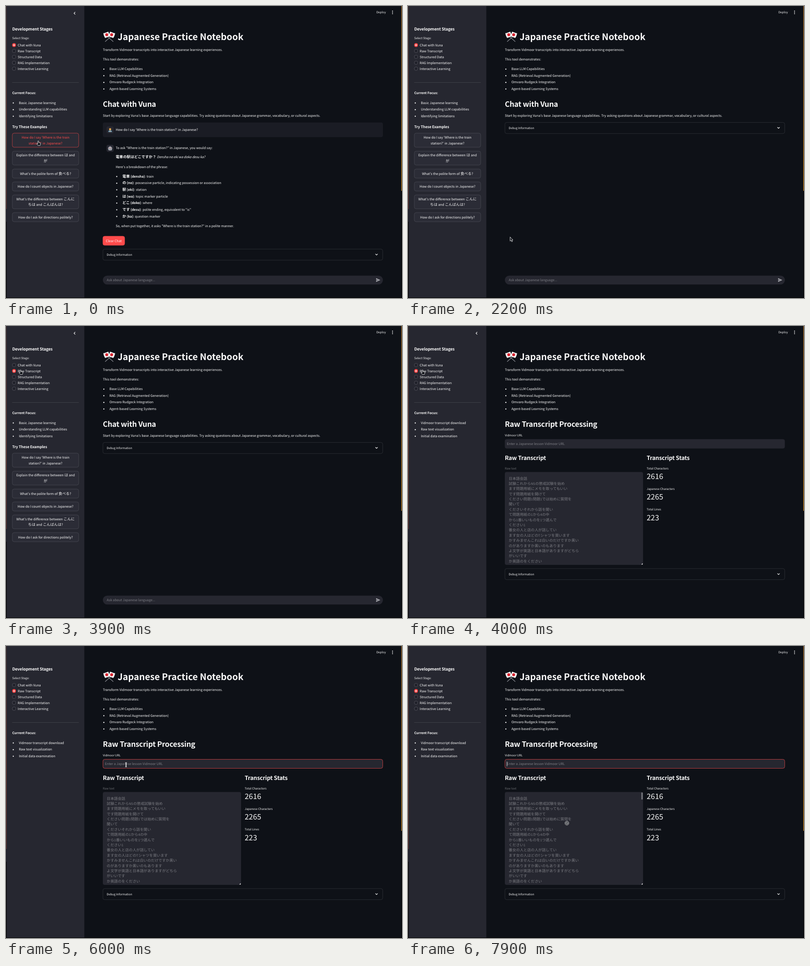
Animation, 871 px wide and 643 px high, one loop 8 s. Source, as an HTML page:

```html
<!DOCTYPE html>
<html>
<head>
<meta charset="utf-8">
<title>Language study app</title>
<style>
html, body { margin: 0; width: 100%; height: 100%; overflow: hidden; background: #000; }
svg { display: block; width: 871px; height: 643px; }
text {
  font-family: "Noto Sans CJK JP", "Noto Sans CJK", "Noto Sans", sans-serif;
  fill: #fafafa; white-space: pre; text-rendering: geometricPrecision; cursor: default;
}
.b { font-weight: 700; }
.h { font-weight: 600; letter-spacing: -.014em; }
.i { font-style: italic; letter-spacing: -.012em; }
.mid { text-anchor: middle; }
.hint { fill: #7e7f85; }
.off { fill: #7b7c82; }
.label-off { fill: #6c6e73; }
.line { fill: none; stroke: #3d4045; stroke-width: .6; }
.icon { fill: none; stroke: #fafafa; stroke-width: 1.2; }
.btn rect { fill: #2b2c36; stroke: #55565e; stroke-width: .6; }
.btn.hot rect { stroke: #ff4b4b; }
.btn.hot text { fill: #ff4b4b; }
#clear rect { fill: #ff4b4b; stroke: #ff4b4b; stroke-width: .7; }
#clear.hover rect { fill: #f23f40; stroke: #f23f40; }
#clear.down rect { fill: none; stroke: #ff4b4b; }
#clear.down text { fill: #ff4b4b; }
.radio circle:first-child { fill: #20212a; stroke: #6a6b72; stroke-width: .6; }
.radio circle:last-of-type { fill: none; }
.radio.on circle:first-child { fill: #ff4b4b; stroke: #ff4b4b; }
.radio.on circle:last-of-type { fill: #fff; }
#field { fill: #262730; stroke: #262730; stroke-width: .7; }
#field.focus { stroke: #ff4b4b; }
#cursor > * { fill: #0e1117; stroke: #fff; stroke-width: .8; stroke-linejoin: round; }
</style>
</head>
<body>
<svg id="stage" viewBox="0 0 871 643"></svg>
<script>
const BODY = 8.15, SMALL = 7.12, H1 = 22.2, H2 = 18.1, H3 = 14.1;
const LATIN = 1 / 1.118; // Latin glyphs run large next to kana

const kana = (s, size) =>
  s.replace(/[\u3000-\u9fff\uff00-\uffef]+/g, m => `<tspan font-size="${size}">${m}</tspan>`);

// *bold* and _italic_ markup, centred vertically on cy
function text(x, cy, s, size = BODY, cls = '') {
  const body = s.split(/(\*[^*]+\*|_[^_]+_)/).map(p => {
    const c = p[0] === '*' ? 'b' : p[0] === '_' ? 'i' : '';
    return c ? `<tspan class="${c}">${kana(p.slice(1, -1), size)}</tspan>` : kana(p, size);
  }).join('');
  return `<text x="${x}" y="${cy + size * .33}" font-size="${size * LATIN}" class="${cls}">${body}</text>`;
}
const rect = (x, y, w, h, r, attrs) =>
  `<rect x="${x}" y="${y}" width="${w}" height="${h}" rx="${r}" ${attrs}/>`;
const bullets = (x, tx, y, items) => items.map((s, i) => {
  const cy = y + i * 14.65;
  return `<circle cx="${x}" cy="${cy + .5}" r="1.25" fill="#fafafa"/>` + text(tx, cy, s);
}).join('');
const group = (id, body) => `<g id="${id}">${body}</g>`;

const stages = ['Chat with Vuna', 'Raw Transcript', 'Structured Data', 'RAG Implementation', 'Interactive Learning'];
const examples = [
  [280, 31, "How do I say 'Where is the train", "station?' in Japanese?"],
  [319.6, 30.6, 'Explain the difference between は and', 'が'],
  [359, 20, "What's the polite form of 食べる?"],
  [387.4, 20, 'How do I count objects in Japanese?'],
  [416, 30.6, "What's the difference between こんに", 'ちは and こんばんは?'],
  [455, 20, 'How do I ask for directions politely?']
];
const transcript = `日本語会話
試験これからN5の懲戒試験を始め
ます問題用紙にメモを取ってもいい
です問題用紙を開けて
ください問題1問題1では始めに質問を
聞いて
くださいそれから話を聞い
て問題用紙の1から4の中
から1番いいものを1つ選んで
ください1
番女の人と店の人が話してい
ます女の人はどのTシャツを買います
かすみませんこれは白いのだけですか黒い
のがありますか黒いのもあります
よ文字が英語と日本語がありますがどちら
がいいです
か英語のをください`.split('\n');

const backdrop = `
  <defs>
    <linearGradient id="left" x2="0" y2="1"><stop stop-color="#3b2a2c"/><stop offset=".6" stop-color="#7a4034"/><stop offset="1" stop-color="#5c2f2b"/></linearGradient>
    <linearGradient id="right" x2="0" y2="1"><stop stop-color="#a8702a"/><stop offset="1" stop-color="#d08a1e"/></linearGradient>
  </defs>` +
  rect(0, 0, 871, 643, 0, 'fill="#000"') +
  rect(0, 0, 2, 447, 0, 'fill="url(#left)"') +
  rect(0, 447, 2, 28, 0, 'fill="#1d1b26"') +
  rect(869, 0, 2, 407, 0, 'fill="url(#right)"') +
  rect(172, 0, 697.7, 642, 0, 'fill="#0e1117"') +
  rect(1.3, 0, 171, 642, 0, 'fill="#262730"');

const sidebar =
  `<path id="fold" class="icon" d="M152.3 13.2L149.6 15.9L152.3 18.6"/>` +
  text(13.7, 50.5, 'Development Stages', 10.1, 'h') +
  text(13.7, 71, 'Select Stage:', SMALL) +
  stages.map((s, i) => {
    const cy = 86 + i * 13;
    return `<g class="radio"><circle cx="17.7" cy="${cy}" r="3.9"/><circle cx="17.7" cy="${cy}" r="1.5"/>${text(25.8, cy, s)}</g>`;
  }).join('') +
  `<path class="line" style="stroke:#51525a" d="M13.7 168.5H160"/>` +
  text(13.7, 191.5, '*Current Focus:*');

const chatSide = bullets(16, 28.2, 213, ['Basic Japanese learning', 'Understanding LLM capabilities', 'Identifying limitations']) +
  text(13.7, 266.5, 'Try These Examples', 9.09, 'h') +
  examples.map(([y, h, ...rows]) => '<g class="btn">' + rect(13.9, y, 146, h, 4, '') +
    rows.map((s, i) => text(86.9, y + h / 2 + (i - (rows.length - 1) / 2) * 12.9, s, BODY, 'mid')).join('') + '</g>').join('');

const flag = `<path d="M0 0L11 -4Q13 2 15 6L4 10Q1 5 0 0Z" fill="#f4f4f4"/><circle cx="7.6" cy="2.8" r="3.2" fill="#d8232f"/>`;
const flags =
  `<path d="M214.5 59.5L236 78.5M239.5 59.5L218 78.5" stroke="#8d8f96" stroke-width="1.1"/>` +
  `<g transform="translate(214 60.5)">${flag}</g><g transform="matrix(-1 0 0 1 240 60.5)">${flag}</g>`;

const header =
  text(814.7, 14, 'Deploy', SMALL) +
  [11, 14, 17].map(y => `<circle cx="850.2" cy="${y}" r=".95" fill="#fafafa"/>`).join('') +
  flags +
  text(245.5, 68, 'Japanese Practice Notebook', H1, 'b') +
  text(213, 96, 'Transform Vidmoor transcripts into interactive Japanese learning experiences.') +
  text(213, 117, 'This tool demonstrates:') +
  bullets(215.2, 227.4, 138.4, ['Base LLM Capabilities', 'RAG (Retrieval Augmented Generation)',
    'Omvaro Rudgeck Integration', 'Agent-based Learning Systems']);

const avatar = (y, body) => `<g transform="translate(229 ${y})">` +
  rect(-7.8, -7.8, 15.6, 15.6, 4, 'fill="#262730"') + body + '</g>';
const person = `<circle cy="-1.8" r="3" fill="#4b3428"/><circle cy="-1.2" r="2.2" fill="#e9b45c"/>
  <path d="M-4.2 4.5Q-4 1 0 1T4.2 4.5Z" fill="#4a9fc4"/><path d="M-2.8 1.8H2.8V4.8H-2.8Z" fill="#9aa0a6"/>`;
const robot = `<path d="M0 -5V-3" stroke="#d0d3d8"/><rect x="-4.5" y="-1.5" width="9" height="3.5" fill="#7b8794"/>
  <rect x="-3.6" y="-3.4" width="7.2" height="8" rx="1.6" fill="#b4bcc4"/>
  <circle cx="-1.6" cy="-.6" r=".9" fill="#a3423c"/><circle cx="1.6" cy="-.6" r=".9" fill="#a3423c"/><path d="M-2 2.6H2" stroke="#4d555e"/>`;

const chatHead = text(213, 216, 'Chat with Vuna', H2, 'h') +
  text(213, 241.5, "Start by exploring Vuna's base Japanese language capabilities. Try asking questions about Japanese grammar, vocabulary, or cultural aspects.") +
  rect(213, 593.7, 616, 19.6, 9.8, 'fill="#262730"') +
  text(221.4, 603.6, 'Ask about Japanese language...', BODY, 'hint') +
  `<path d="M814 599.2L823.3 603.4L814 607.6V604.3L820 603.4L814 602.5Z" fill="#a9aab0"/>`;

const messages = rect(213, 256.6, 616, 32.2, 4, 'fill="#1a1c24"') +
  avatar(272.7, person) + text(241.2, 272.5, "How do I say 'Where is the train station?' in Japanese?") +
  avatar(313.5, robot) + text(241.2, 312, 'To ask "Where is the train station?" in Japanese, you would say:') +
  text(241.2, 332.5, '*電車の駅はどこですか？* _Densha no eki wa doko desu ka?_') +
  text(241.2, 354, "Here's a breakdown of the phrase:") +
  bullets(243.6, 256, 375, ['*電車 (densha)*: train', '*の (no)*: possessive particle, indicating possession or association',
    '*駅 (eki)*: station', '*は (wa)*: topic marker particle', '*どこ (doko)*: where',
    '*です (desu)*: polite ending, equivalent to "is"', '*か (ka)*: question marker']) +
  text(241.2, 484, 'So, when put together, it asks "Where is the train station?" in a polite manner.') +
  group('clear', rect(213.1, 506.9, 47.9, 20, 4, '') + text(237, 517, 'Clear Chat', BODY, 'mid'));

const debug = rect(213.1, -12.2, 615.5, 24.4, 4, 'class="line"') +
  text(221.5, 0, 'Debug Information', SMALL) +
  `<path class="icon" d="M812.5 -1.6L815 .9L817.5 -1.6"/>`;

const stats = [['Total Characters', 2616], ['Japanese Characters', 2265], ['Total Lines', 223]];
const rawPage = bullets(16, 28.2, 213, ['Vidmoor transcript download', 'Raw text visualization', 'Initial data examination']) +
  text(213, 216, 'Raw Transcript Processing', H2, 'h') +
  text(213, 241, 'Vidmoor URL', SMALL) +
  rect(213.2, 249.6, 615.4, 19.8, 4, 'id="field"') +
  text(217.5, 259.7, 'Enter a Japanese lesson Vidmoor URL', BODY, 'hint') +
  rect(217.4, 254.5, .8, 10.5, 0, 'id="caret" fill="#fafafa"') +
  text(213, 290, 'Raw Transcript', H3, 'h') +
  text(525, 290, 'Transcript Stats', H3, 'h') +
  text(213, 313.5, 'Raw text', SMALL, 'label-off') +
  rect(213, 321.5, 304, 204.5, 4, 'fill="#262730"') +
  transcript.map((s, i) => text(221.6, 335.9 + i * 11.38, s, BODY, 'off')).join('') +
  rect(513.2, 322.4, 3.2, 15.6, 1, 'id="thumb" fill="#73747a"') +
  `<path d="M516.2 522.2V525.2H513.2Z" fill="#fff"/>` +
  stats.map(([s, n], i) => text(525, 313.5 + i * 45.2, s, SMALL) + text(525, 331.2 + i * 45.2, '' + n, 18.3)).join('');

const pointers = `
  <path id="arrow" d="M0 0V9L2.1 7.2L3.7 10.5L5.2 9.8L3.7 6.6H6.2Z"/>
  <path id="hand" d="M-1 .9C-1 -.4 1 -.4 1 .9V3.8L5 4.8V7.4L4 10H-.6L-3.4 6.2L-2.6 5.3L-1 6.4Z"/>
  <path id="beam" d="M-2 -4.8H-.5V4.8H-2M2 -4.8H.5V4.8H2" style="fill:none"/>
  <g id="deny"><circle r="4.1"/><circle r="2.2"/><path d="M-1.5 -1.5L1.5 1.5"/></g>`;

const stage = document.getElementById('stage');
stage.innerHTML = backdrop + sidebar + header + group('chatSide', chatSide) + group('chatHead', chatHead) +
  group('messages', messages) + group('rawPage', rawPage) + group('debug', debug) + group('cursor', pointers);

const $ = id => document.getElementById(id);
const show = (el, on) => el.style.display = on ? '' : 'none';
const radios = [...stage.querySelectorAll('.radio')];
const buttons = [...stage.querySelectorAll('.btn')];

// time, x, y of the pointer
const path = [
  [0, 71, 297], [200, 71, 297], [1100, 241, 520], [1200, 242, 521], [1900, 242, 521],
  [2200, 224.6, 508.6], [2600, 66, 216], [3000, 66, 216], [3100, 18, 99], [3200, 18, 99],
  [3400, 32, 98], [3600, 32, 98], [3700, 32, 96.7], [4100, 32, 96.7], [4200, 36.5, 109],
  [4300, 36.5, 109], [4500, 173, 254], [4600, 173, 254], [5000, 250, 263], [5100, 250, 263],
  [5500, 264, 261.5], [6000, 264, 261.5], [6500, 275, 257], [6700, 293, 379], [6800, 293, 379],
  [7300, 348, 404], [7700, 307, 372], [7900, 349.5, 390]
];
function pointerAt(t) {
  const i = path.findIndex(p => p[0] > t);
  if (i < 0) return path[path.length - 1].slice(1);
  const [a, b] = [path[i - 1], path[i]], k = (t - a[0]) / (b[0] - a[0]);
  return [1, 2].map(n => a[n] + (b[n] - a[n]) * k);
}

function draw() {
  const t = Math.floor(performance.now() % 8000 / 100) * 100; // ten steps a second
  const [x, y] = pointerAt(t);
  const over = (l, top, r, bottom) => x >= l && x <= r && y >= top && y <= bottom;
  const full = t < 2000, raw = t >= 4000;

  show($('chatSide'), !raw);
  show($('chatHead'), !raw);
  show($('messages'), full);
  show($('rawPage'), raw);
  $('debug').setAttribute('transform', `translate(0 ${full ? 547.5 : raw ? 546.4 : 268.6})`);
  show($('fold'), x < 174);

  const picked = t < 3700 ? 0 : 1;
  radios.forEach((r, i) => r.classList.toggle('on', i === picked));

  let hand = over(13, 80, 97, 143);
  buttons.forEach((b, i) => {
    const [top, h] = examples[i], hit = !raw && over(14, top, 160, top + h);
    hand = hand || hit;
    b.classList.toggle('hot', hit || (i === 0 && t < 1500));
  });
  const onClear = full && over(213, 507, 261, 527);
  $('clear').classList.toggle('hover', onClear);
  $('clear').classList.toggle('down', t >= 1500 && t < 1700);

  $('field').classList.toggle('focus', t >= 4900);
  show($('caret'), t >= 5500 && (t - 5500) % 1000 < 500);
  show($('thumb'), t >= 6900);

  const kind = raw && over(213, 249, 829, 270) ? 'beam'
    : raw && over(213, 321, 517, 526) ? 'deny'
    : hand || onClear ? 'hand' : 'arrow';
  for (const el of $('cursor').children) show(el, el.id === kind);
  $('cursor').setAttribute('transform', `translate(${x} ${y})`);
  requestAnimationFrame(draw);
}
draw();
</script>
</body>
</html>
```
